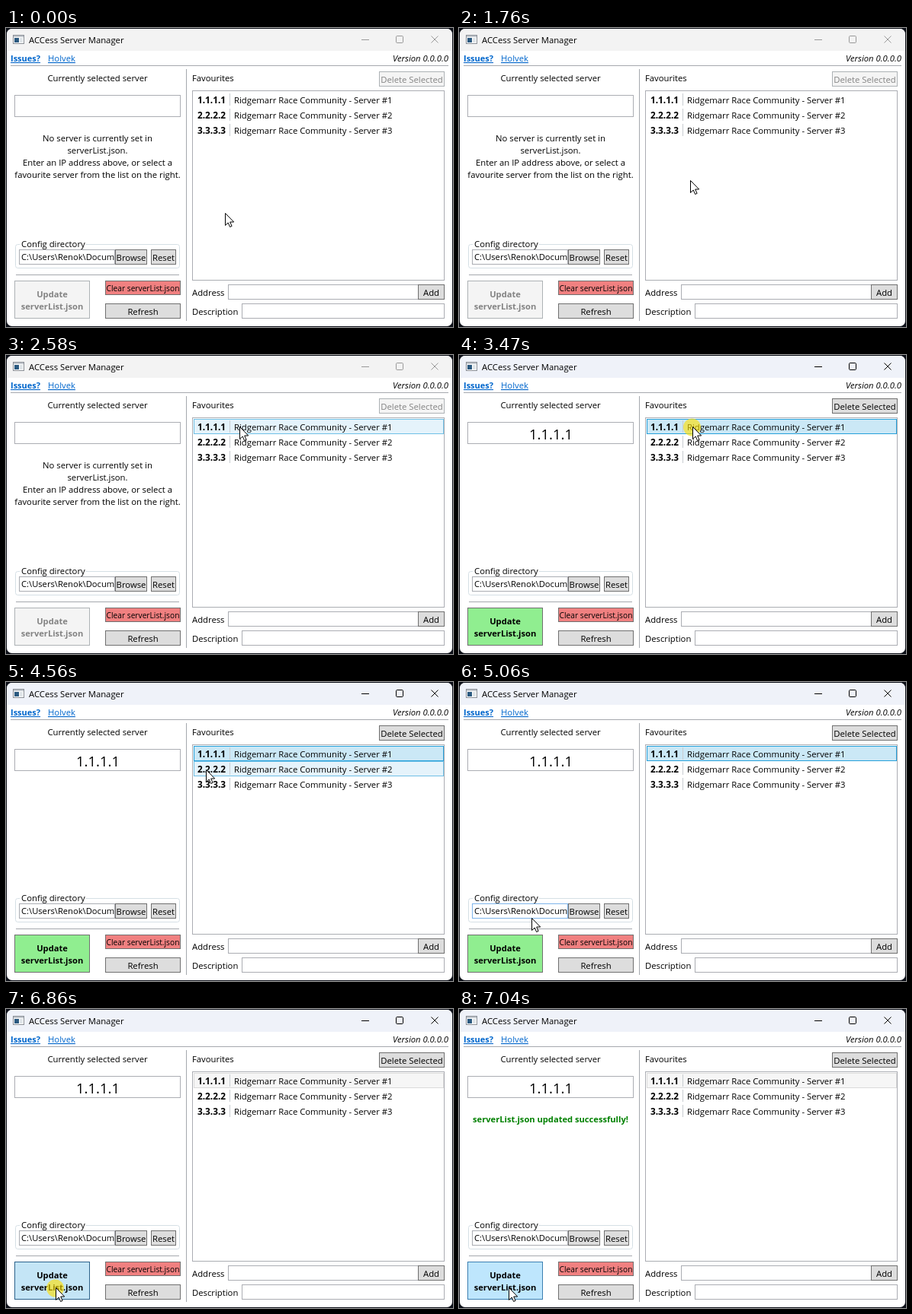
An HTML page for the animation above (8000 ms loop, 586 by 393 pixels).

```html
<!DOCTYPE html>
<html lang="en">
<head>
<meta charset="utf-8">
<title>Server manager</title>
<style>
  html, body { margin: 0; width: 100%; height: 100%; overflow: hidden; background: #0d1018; }
  svg { display: block; font: 11.3px "Open Sans", "Noto Sans", sans-serif; }
  text { white-space: pre; }
  .mid { text-anchor: middle; }
  .bold { font-weight: 700; font-size: 11.15px; }
  .link { fill: #0066cc; text-decoration: underline; }
  .line { stroke: #a5a8ae; fill: none; }
  .box { fill: #fff; stroke: #abadb3; }
  .btn { fill: #ddd; stroke: #707070; }
  .ip { font-weight: 700; font-size: 11.8px; }

  #bar { fill: #f3f3f3; }
  #caption { stroke: #999; fill: none; }
  #del, #update { fill: #f4f4f4; stroke: #adb2b5; }
  #delText, #updateText { fill: #838383; }
  .picked, #done, #click { visibility: hidden; }

  .active #bar { fill: #eff2f9; }
  .active #caption { stroke: #000; }
  .active #del { fill: #ddd; stroke: #707070; }
  .active #update { fill: #90ee90; stroke: #707070; }
  .active #delText, .active #updateText { fill: #000; }
  .active .picked { visibility: visible; }
  .active #hint { visibility: hidden; }

  .row { fill: none; stroke: none; }
  .row.hover { fill: #e5f3fb; stroke: #70c0e6; }
  .active #row0 { fill: #cbe8f6; stroke: #26a0da; }
  .blurred #row0 { fill: #f6f6f6; stroke: #dadada; }
  #path.hover { stroke: #7eb4ea; }
  .active #update.hover { fill: #bee6fd; stroke: #3c7fb1; }
  .pressed #update.hover { fill: #c4e5f6; stroke: #2c628b; }
  .done #done, .ring #click { visibility: visible; }
</style>
</head>
<body>
<svg id="app" width="586" height="393" viewBox="0 0 586 393">
  <defs>
    <clipPath id="win"><rect x="1" y="1" width="584" height="391" rx="7"/></clipPath>
    <clipPath id="pathClip"><rect x="18" y="292" width="124" height="19"/></clipPath>
  </defs>

  <g clip-path="url(#win)">
    <rect width="586" height="393" fill="#fff"/>
    <rect id="bar" width="586" height="30"/>
  </g>

  <!-- title bar -->
  <rect x="9.5" y="9.5" width="14" height="11" fill="#fff" stroke="#8a8f96"/>
  <path d="M10 10h13v2h-13z" fill="#c3c8ce"/>
  <path d="M11 13h6v6h-6z" fill="#2c5a80"/>
  <path d="M18 13h4v6h-4z" fill="#dfe4e8"/>
  <text x="30" y="20">ACCess Server Manager</text>
  <g id="caption">
    <path d="M466 15.5h10"/>
    <rect x="511.5" y="10.5" width="9" height="9" rx="1.2"/>
    <path d="M557.5 10.5l9 9m0-9l-9 9"/>
  </g>

  <!-- link row -->
  <text class="bold link" x="6" y="44" style="font-size:11px">Issues?</text>
  <text class="link" x="55" y="44">Holvek</text>
  <text x="580" y="44" text-anchor="end" font-style="italic">Version 0.0.0.0</text>
  <path class="line" d="M6 49.5h574M236.5 54v331M13 324.5h214"/>

  <!-- left pane -->
  <text class="mid" x="120" y="70">Currently selected server</text>
  <rect class="box" x="11.5" y="88.5" width="217" height="28"/>
  <text class="mid picked" x="120.5" y="111" style="font-size:18.5px">1.1.1.1</text>
  <g class="mid" id="hint">
    <text x="120" y="149">No server is currently set in</text>
    <text x="120" y="165">serverList.json.</text>
    <text x="120" y="181">Enter an IP address above, or select a</text>
    <text x="120" y="197">favourite server from the list on the right.</text>
  </g>
  <text class="mid bold" id="done" x="120" y="149" fill="#008000">serverList.json updated successfully!</text>

  <rect x="12.5" y="284.5" width="215" height="31" rx="3" fill="none" stroke="#d5dfe5"/>
  <path d="M18 284.5h87" stroke="#fff" stroke-width="3"/>
  <text x="20" y="288">Config directory</text>
  <rect class="box" id="path" x="17.5" y="291.5" width="125" height="19"/>
  <text x="20" y="305" clip-path="url(#pathClip)" style="font-size:11.2px">C:\Users\Renok\Documents</text>
  <rect class="btn" x="143.5" y="291.5" width="41" height="19"/>
  <text class="mid" x="164" y="305.5">Browse</text>
  <rect class="btn" x="190.5" y="291.5" width="32" height="19"/>
  <text class="mid" x="206.5" y="305.5">Reset</text>

  <rect id="update" x="11.5" y="332.5" width="98" height="49"/>
  <g class="mid bold" id="updateText">
    <text x="60.5" y="354">Update</text>
    <text x="60.5" y="370">serverList.json</text>
  </g>
  <rect class="btn" x="130.5" y="332.5" width="98" height="18" style="fill:#f08080"/>
  <text class="mid" x="179.5" y="346" style="font-size:10.2px">Clear serverList.json</text>
  <rect class="btn" x="130.5" y="362.5" width="98" height="19"/>
  <text class="mid" x="179.5" y="377">Refresh</text>

  <!-- right pane -->
  <text x="244" y="70">Favourites</text>
  <rect id="del" x="489.5" y="57.5" width="85" height="19"/>
  <text class="mid" id="delText" x="532" y="72">Delete Selected</text>
  <rect class="box" x="244.5" y="82.5" width="330" height="249"/>
  <g id="list"></g>
  <text x="244" y="352">Address</text>
  <rect class="box" x="291.5" y="337.5" width="249" height="19"/>
  <rect class="btn" x="540.5" y="337.5" width="34" height="19"/>
  <text class="mid" x="557.5" y="352">Add</text>
  <text x="244" y="377">Description</text>
  <rect class="box" x="309.5" y="362.5" width="265" height="19"/>

  <g id="cursor">
    <circle id="click" cx="-.5" cy="1" r="11.5" fill="#ffe100" fill-opacity=".62"/>
    <path d="M.5 .5v16l3.7-3.5 2.4 5.5 2.5-1.1-2.4-5.4h5z" fill="#fff" stroke="#000"/>
  </g>
</svg>

<script>
const LOOP = 8000;
const $ = id => document.getElementById(id);

$('list').innerHTML = [1, 2, 3].map((n, i) => {
  const y = 84 + 20 * i;
  return `<rect class="row" id="row${i}" x="246.5" y="${y + .5}" width="327" height="19"/>
    <path d="M293.5 ${y + 2}v16" stroke="#c8ccd0"/>
    <text class="ip" x="251" y="${y + 15}">${[n, n, n, n].join('.')}</text>
    <text x="299" y="${y + 15}">Ridgemarr Race Community - Server #${n}</text>`;
}).join('');

// Pointer path: time, x, y
const PATH = [
  [1160, 287, 243], [1760, 303, 200], [2060, 305, 159], [2580, 306, 94],
  [4160, 306, 94], [4560, 262, 115], [5060, 95, 310], [5460, 65, 366]
];

const RUNS = [[1260, 2060, 9], [2160, 2580, 5], [4260, 5060, 9], [5180, 5460, 4]];
const TICKS = RUNS.flatMap(([a, b, n]) =>
  Array.from({ length: n }, (_, i) => a + (b - a) * i / (n - 1)));

const snap = t => TICKS.reduce((last, k) => k <= t ? k : last, 0);

function slope(i, axis) {
  const p = PATH[i], q = PATH[i + 1];
  return p && q ? (q[axis] - p[axis]) / (q[0] - p[0]) : 0;
}

// Harmonic mean keeps the curve monotone and at rest where the pointer rests
function tangent(i, axis) {
  const a = slope(i - 1, axis), b = slope(i, axis);
  return a * b > 0 ? 2 * a * b / (a + b) : 0;
}

function along(t, axis) {
  const end = PATH.length - 1;
  if (t <= PATH[0][0]) return PATH[0][axis];
  if (t >= PATH[end][0]) return PATH[end][axis];
  const i = PATH.findIndex(p => p[0] > t) - 1;
  const [p, q] = [PATH[i], PATH[i + 1]];
  const d = q[0] - p[0], s = (t - p[0]) / d, r = 1 - s;
  return p[axis] * (1 + 2 * s) * r * r + q[axis] * s * s * (3 - 2 * s)
    + d * s * r * (tangent(i, axis) * r - tangent(i + 1, axis) * s);
}

const targets = ['row0', 'row1', 'row2', 'path', 'update'].map(id => {
  const el = $(id), get = name => +el.getAttribute(name);
  const x = get('x') - .5, y = get('y') - .5;
  return { el, x, y, right: x + get('width') + 1, bottom: y + get('height') + 1 };
});

function draw(t) {
  const tick = snap(t);
  const x = Math.round(along(tick, 1)), y = Math.round(along(tick, 2));
  $('cursor').setAttribute('transform', `translate(${x} ${y})`);
  for (const b of targets)
    b.el.classList.toggle('hover', x >= b.x && x < b.right && y >= b.y && y < b.bottom);

  const during = (a, b = LOOP) => t >= a && t < b;
  const state = {
    active: during(3470),
    ring: during(3470, 3570) || during(6860, 7040),
    blurred: during(6860),
    pressed: during(6860, 7040),
    done: during(7040)
  };
  for (const name in state) $('app').classList.toggle(name, state[name]);
}

const start = performance.now();
function frame() {
  draw((performance.now() - start) % LOOP);
  requestAnimationFrame(frame);
}
frame();
</script>
</body>
</html>
```
